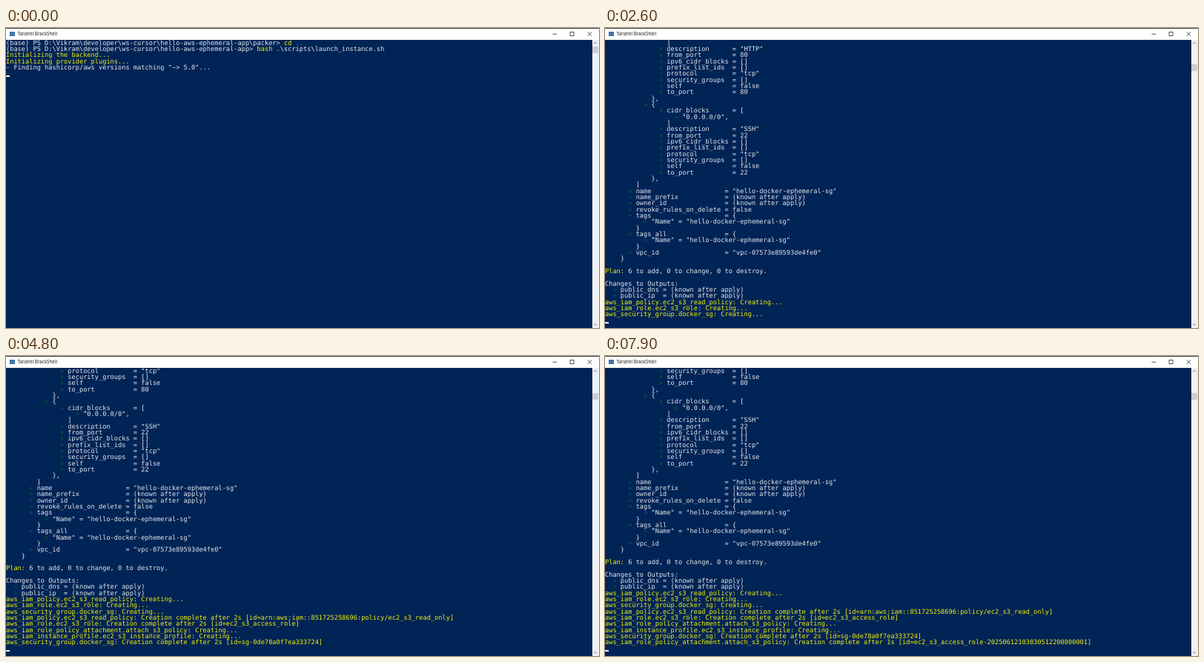
An HTML page for the animation above (8000 ms loop, 800 px wide and 405 px high).

```html
<!DOCTYPE html>
<html lang="en">
<head>
<meta charset="utf-8">
<title>Terminal</title>
<style>
  html, body { margin: 0; width: 100%; height: 100%; overflow: hidden; background: #012456; }
  #stage { position: absolute; left: 0; top: 0; width: 800px; height: 405px; overflow: hidden; background: #012456; }
  #bar { position: absolute; left: 0; top: 0; width: 800px; height: 16px; background: #fff; }
  #bar i { position: absolute; left: 5px; top: 5px; width: 7px; height: 6px; background: #3c74ad; }
  #bar span { position: absolute; left: 15.6px; top: 3px; font: 6.25px/10px "Open Sans", "Noto Sans", sans-serif; color: #111; white-space: pre; }
  svg { position: absolute; left: 0; top: 0; }
  /* Cells are 10 x 16 units, shown at 800/1536 scale */
  #log {
    position: absolute; left: 0.2px; top: 15.6px; margin: 0;
    font: 16.61px/16px "DejaVu Sans Mono", "Liberation Mono", monospace;
    color: #e6e8ec; white-space: pre; text-rendering: geometricPrecision;
    font-variant-ligatures: none;
    transform: scale(0.520833); transform-origin: 0 0;
  }
  .y { color: #f2f20c; }
  .g { color: #0b5c36; }
  .d { color: #7684a0; }
  #cursor { position: absolute; left: 0; width: 5.4px; height: 2.2px; background: #f4f3dc; }
  #scroll { position: absolute; left: 791px; top: 16px; width: 9px; height: 389px; background: #f0f0f0; }
  #thumb { position: absolute; left: 791px; width: 8px; height: 9px; background: #cdcdcd; }
</style>
</head>
<body>
<div id="stage">
  <pre id="log"></pre>
  <div id="cursor"></div>
  <div id="bar"><i></i><span>Tandrel BrackShell</span></div>
  <div id="scroll"></div>
  <div id="thumb"></div>
  <svg width="800" height="405" fill="none" stroke="#222" stroke-width="0.8">
    <path d="M0 0.5H800" stroke="#444" stroke-width="1"/>
    <path d="M737.5 8.2h5.5M761 5.5h5v5h-5zM784.7 5.3l5.4 5.4M790.1 5.3l-5.4 5.4"/>
    <path d="M793 21.3l2-2 2 2M793 399.2l2 2 2-2" stroke="#606060"/>
  </svg>
</div>
<script>
const LOOP = 8000, ROW = 8.3333, LOG_TOP = 16, ROWS = 45;
const $ = id => document.getElementById(id);
const span = (cls, s) => `<span class="${cls}">${s}</span>`;
const pad = n => " ".repeat(n);
const later = "(known after apply)";

// "+ key = value" with the key padded to a common width
const attr = (indent, width, key, value) => `${pad(indent)}+ ${key.padEnd(width)} = ${value}`;

const rule = (label, port) => {
  const field = (key, value) => attr(14, 16, key, value);
  return [
    pad(10) + "+ {",
    field("cidr_blocks", "["),
    pad(18) + '+ "0.0.0.0/0",',
    pad(16) + "]",
    field("description", `"${label}"`),
    field("from_port", port),
    field("ipv6_cidr_blocks", "[]"),
    field("prefix_list_ids", "[]"),
    field("protocol", '"tcp"'),
    field("security_groups", "[]"),
    field("self", "false"),
    field("to_port", port),
    pad(12) + "},"
  ];
};

const sgName = '"hello-docker-ephemeral-sg"';
const prop = (key, value) => attr(6, 22, key, value);
const tags = key => [prop(key, "{"), attr(10, 6, '"Name"', sgName), pad(8) + "}"];

const plan = [
  ...rule("HTTP", 80),
  ...rule("SSH", 22),
  pad(8) + "]",
  prop("name", sgName),
  prop("name_prefix", later),
  prop("owner_id", later),
  prop("revoke_rules_on_delete", "false"),
  ...tags("tags"),
  ...tags("tags_all"),
  prop("vpc_id", '"vpc-07573e89593de4fe0"'),
  "    }",
  "",
  "Plan: 6 to add, 0 to change, 0 to destroy.",
  "",
  "Changes to Outputs:",
  attr(2, 10, "public_dns", later),
  attr(2, 10, "public_ip", later)
];

const policy = "aws_iam_policy.ec2_s3_read_policy", role = "aws_iam_role.ec2_s3_role";
const group = "aws_security_group.docker_sg", attach = "aws_iam_role_policy_attachment.attach_s3_policy";
const begin = name => `${name}: Creating...`;
const done = (name, sec, id) => `${name}: Creation complete after ${sec}s [id=${id}]`;

const lines = [
  ...plan,
  begin(policy), begin(role), begin(group),
  done(policy, 2, "arn:aws:iam::851725258696:policy/ec2_s3_read_only"),
  done(role, 2, "ec2_s3_access_role"),
  begin(attach),
  begin("aws_iam_instance_profile.ec2_s3_instance_profile"),
  done(group, 2, "sg-0de78a0f7ea333724"),
  done(attach, 1, "ec2_s3_access_role-20250612103830512200000001")
];

const cwd = "(base) PS D:\\Vikram\\developer\\ws-cursor\\hello-aws-ephemeral-app";
const intro = [
  `${cwd}\\packer&gt; ${span("y", "cd")} ${span("d", "..")}`,
  `${cwd}&gt; ${span("y", "bash")} .\\scripts\\launch_instance.sh`,
  span("y", "Initializing the backend..."),
  span("y", "Initializing provider plugins..."),
  '- Finding hashicorp/aws versions matching "~&gt; 5.0"...'
];

const paint = s => s.startsWith("aws_") ? span("y", s)
  : s.replace(/^( *)\+/, (m, gap) => gap + span("g", "+")).replace(/^Plan:/, span("y", "Plan:"));

// [time, lines added after the plan]; -1 is the opening screen
const steps = [[0, -1], [1300, 0], [2600, 3], [4100, 4], [4800, 8], [5300, 9]];
const screens = steps.map(([, n]) =>
  (n < 0 ? intro : lines.slice(n, n + ROWS).map(paint)).join("\n"));
const hidden = [[100, 500], [2100, 2600], [3600, 4100], [6300, 6800], [7300, 7800]];

let shown = -1;
function show(i) {
  if (i === shown) return;
  shown = i;
  const n = steps[i][1], row = n < 0 ? intro.length : ROWS;
  // A leading line break would be dropped by <pre>, so none of the screens starts with one
  $("log").innerHTML = screens[i];
  $("cursor").style.top = LOG_TOP + (row + 1) * ROW - 2.3 + "px";
  $("thumb").style.top = (n < 0 ? 25 : 49 + n / 8) + "px";
}

const start = performance.now();
function frame() {
  const t = (performance.now() - start) % LOOP;
  show(steps.filter(s => s[0] <= t).length - 1);
  $("cursor").style.visibility = hidden.some(([a, b]) => t >= a && t < b) ? "hidden" : "visible";
  requestAnimationFrame(frame);
}
frame();
</script>
</body>
</html>
```
